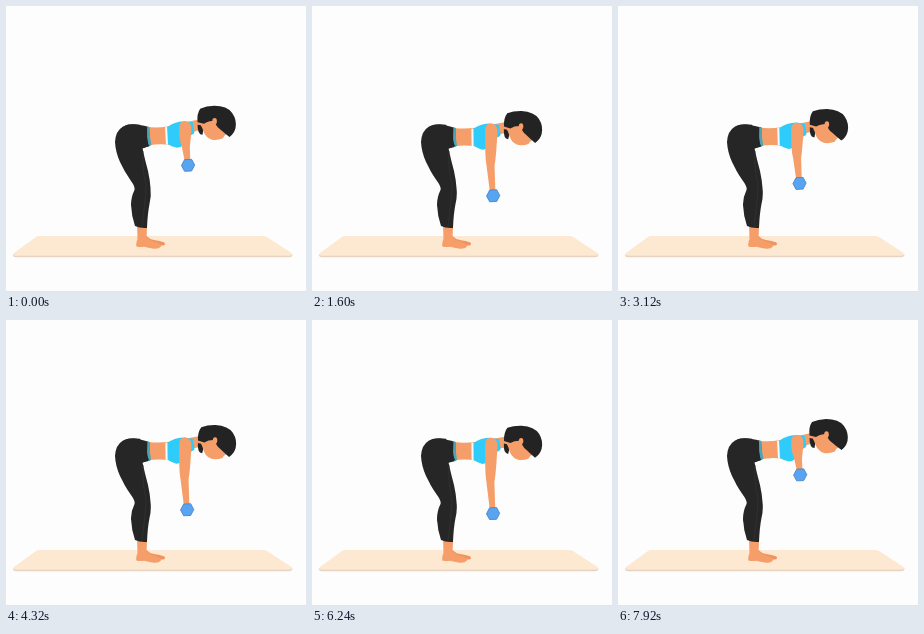
These frames come from a looping animation (300x286 px, 8000 ms). An HTML page:

```html
<!DOCTYPE html>
<html lang="en">
<head>
<meta charset="utf-8">
<title>Bent-over row</title>
<style>
  html, body { margin: 0; width: 100%; height: 100%; overflow: hidden; background: #fdfdfd; }
  svg { display: block; width: 100vw; height: 100vh; }
  .skin { fill: #f59e69; }
  .shade { fill: #f0945f; }
  .dark { fill: #262626; }
  .hair { fill: #242324; }
  .top { fill: #2fcbfa; }
</style>
</head>
<body>
<svg viewBox="0 0 300 286">
  <rect y="285" width="300" height="1" fill="#e3e3e3"/>

  <!-- mat -->
  <path fill="#e6d3c0" d="M7 248 H286.500 Q286.500 251.300 283 251.300 H10 Q6.500 251.300 7 248Z"/>
  <path fill="#fde8d1" d="M33 230 H257 Q259 230 261 231 L285.500 247 Q287.500 249.800 283 249.800 H10 Q5.500 249.800 8 247 L30 231 Q31 230 33 230Z"/>

  <!-- feet -->
  <path class="shade" d="M133 219 H141 L140.500 230 Q143 233 148 234 Q154 234.500 158.500 236.500 Q160 239 157 239.500 L137 240Z"/>
  <path class="skin" d="M131 219 H140.500 L140 231 Q144 235 149 236 Q155 237.500 155 240.500 Q153 243 148 242.700 Q142 242 138 240.800 Q134 241.500 130.500 240.500 Q129.500 238 131.500 233Z"/>

  <!-- upper body -->
  <g id="torso">
    <path class="skin" d="M180 116 L197 112 L202 122 L184 126Z"/>
    <g id="head">
      <path class="hair" d="M191.500 118 L198 119 L196.500 128 Q191.500 128 191.500 118Z"/>
      <path class="skin" d="M193 115 L210 107 L223 126 Q218 128 217 131.500 Q211 134 206 133 Q199 131 196.500 122Z"/>
      <path class="hair" d="M194 102 Q200 99.300 208 99 Q221 99 226 106 Q231 113 229.500 121 Q228 127 223.500 130 Q218 126 214 122.500 Q209 119 209 114 Q202 114 198 117 L191.500 115.500 Q190.500 107 194 102Z"/>
      <ellipse class="skin" cx="208.500" cy="114.500" rx="2.300" ry="3.200"/>
    </g>
    <path class="skin" d="M142 121 Q151 122 163 120 L164 138.500 Q153 137 142 139.500Z"/>
    <path class="top" d="M161 121 Q168 115.500 178 115 L187 116 Q190 121 188 127 L183 130 Q179 141 171 141.500 Q165 140 162 138Z"/>
    <path fill="#f3fafc" d="M159 121 L161 120.700 L162 138.400 L160 138Z"/>
    <path class="skin" d="M186.500 116.500 L190 116 L191 123 L188.500 125Z"/>
    <path class="dark" d="M119 119.500 Q126 116.500 143 121 L144 139.800 L124 146Z"/>
    <path fill="#4aa5b9" d="M141 120.600 L143.300 121 Q143.500 131 145.500 139 L142.600 140 Q140.500 131 141 120.600Z"/>
  </g>

  <!-- legs -->
  <path class="dark" d="M134 118.700 Q124 117 117 120.500 Q109.500 125 109 136 Q109.500 146 114 156 Q118 165 125 175 Q129.500 181 128.500 184 Q125 191 125 199 Q125.500 210 129 220 Q134 222.500 141 222 Q141.500 208 143.500 198 Q145.500 190 144.500 182 Q144 174 142 165 Q139 154 136.500 142.500 L143 140 Z"/>
  <path fill="none" stroke="#343434" stroke-width=".7" d="M137 145 Q136 164 140 178 Q140 190 136 220"/>

  <path id="arm" class="skin"/>
  <g id="bell">
    <path fill="#58a4f1" stroke="#4687d2" stroke-width=".9" stroke-linejoin="round" d="M-6.600 .3 L-3.500 -5.700 L3.500 -6 L6.600 -.3 L3.500 5.700 L-3.500 6Z"/>
  </g>
</svg>
<script>
  const el = id => document.getElementById(id);
  const LOOP = 8000, CYCLE = 2720, FALL = 1260, RISE = 1133, LEAD = 270;
  const ease = p => (1 - Math.cos(Math.PI * p)) / 2;
  const mix = (a, b, k) => a + (b - a) * k;

  // 0 = weight lifted, 1 = arm hanging
  function lowered(t) {
    const p = (t + LEAD) % CYCLE;
    if (p < FALL) return ease(p / FALL);
    return p < CYCLE - RISE ? 1 : ease((CYCLE - p) / RISE);
  }

  function draw(now) {
    const k = lowered(now % LOOP);
    const y = mix(154.8, 195.8, k), x = mix(182.2, 181, k);
    const top = mix(115, 118, k), elbow = mix(top, y, .58);
    el('torso').setAttribute('transform', `rotate(${3 * k} 122 130)`);
    el('head').setAttribute('transform', `translate(0 ${2.5 * k}) rotate(${k} 206 115)`);
    el('arm').setAttribute('d',
      `M173.2 ${top + 6} Q173.5 ${top} 179 ${top} Q185 ${top} 185.5 ${top + 7}` +
      ` Q${mix(185, 184, k)} ${elbow - 8} ${mix(184, 182.3, k)} ${elbow}` +
      ` L${x + 2.2} ${y - 4} L${x - 3.3} ${y - 4}` +
      ` L${mix(176, 174.3, k)} ${elbow} Q172.8 ${elbow - 8} 173.2 ${top + 6}Z`);
    el('bell').setAttribute('transform', `translate(${x} ${y})`);
  }

  const start = performance.now();
  function tick() {
    draw(performance.now() - start);
    requestAnimationFrame(tick);
  }
  tick();
</script>
</body>
</html>
```
